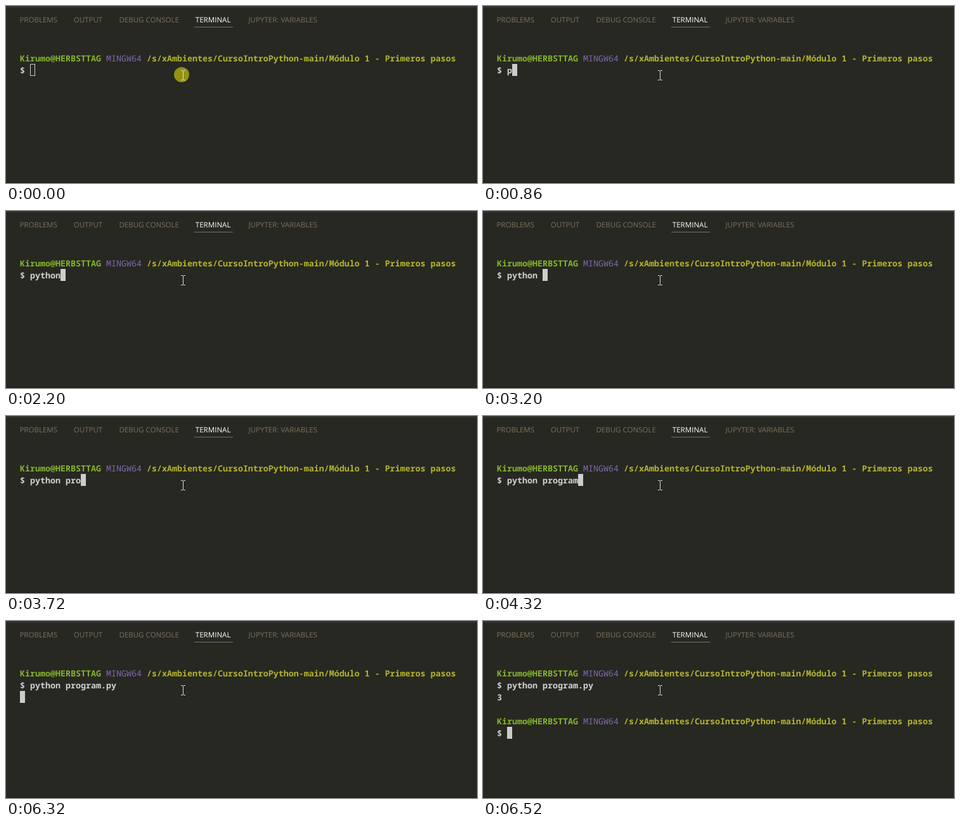
These frames come from a looping animation (743x281 px, 8700 ms). An HTML page:

```html
<!DOCTYPE html>
<html lang="es">
<head>
<meta charset="utf-8">
<title>Terminal</title>
<style>
html, body { margin: 0; width: 100%; height: 100%; overflow: hidden; background: #272822; }
svg { display: block; width: 743px; height: 281px; }
text { white-space: pre; text-rendering: geometricPrecision; }
.tab { font: 11.55px "Open Sans", "Noto Sans", sans-serif; fill: #7d705a; }
.active { fill: #fff; }
.row { font: 600 13.3333px "Noto Sans Mono", "DejaVu Sans Mono", monospace; fill: #d0d0d0; }
.user { fill: #86b42b; }
.sys { fill: #8069b0; font-weight: 500; }
.path { fill: #b3b42b; }
</style>
</head>
<body>
<svg id="stage" viewBox="0 0 743 281">
  <rect width="743" height="281" fill="#272822"/>
  <rect y="1" width="743" height="1" fill="#414339"/>
  <rect y="280" width="743" height="1" fill="#1b1c18"/>
  <rect x="297" y="33" width="61" height="1" fill="#75715e"/>
</svg>
<script>
const LOOP = 8700, LEFT = 22, TOP = 73, COL = 8, ROW = 19;
const COMMAND = "python program.py";
const KEY_TIMES = [860, 1600, 1860, 2000, 2060, 2200, 3200, 3530, 3620, 3720,
                   3860, 3910, 4120, 4320, 4980, 5240, 5510];
const FOCUS = 70, RELEASE = 130, ENTER = 6320, OUTPUT = 6380, PROMPT = 6520;

const stage = document.getElementById("stage");

function add(tag, attrs, parent = stage) {
  const el = document.createElementNS("http://www.w3.org/2000/svg", tag);
  for (const key in attrs) el.setAttribute(key, attrs[key]);
  parent.append(el);
  return el;
}

function label(x, y, cls, content = "") {
  const el = add("text", { x, y, class: cls });
  el.textContent = content;
  return el;
}

const line = (row, content) => label(LEFT, TOP + row * ROW + 15, "row", content);

function prompt(row) {
  const el = line(row);
  const parts = [
    ["user", "Kirumo@HERBSTTAG "],
    ["sys", "MINGW64 "],
    ["path", "/s/xAmbientes/CursoIntroPython-main/Módulo 1 - Primeros pasos"]
  ];
  for (const [cls, content] of parts) add("tspan", { class: cls }, el).textContent = content;
  return el;
}

const show = (el, on) => el.setAttribute("visibility", on ? "visible" : "hidden");

label(21.4, 26, "tab", "PROBLEMS");
label(106.7, 26, "tab", "OUTPUT");
label(178.4, 26, "tab", "DEBUG CONSOLE");
label(298.8, 26, "tab active", "TERMINAL");
label(382.5, 26, "tab", "JUPYTER: VARIABLES");

prompt(0);
const input = line(1, "$ ");
const result = line(2, "3");
const next = [prompt(4), line(5, "$ ")];
const block = add("rect", { width: COL, height: ROW, fill: "#ccc" });
const hollow = add("rect", { x: 38.5, y: 92.5, width: 7, height: 18, fill: "none", stroke: "#ccc" });
const halo = add("circle", { cx: 277, cy: 109, r: 12, fill: "#93930f" });
add("path", {
  d: "M276 102.5h3M280 102.5h3M279.5 103v14M276 117.5h3M280 117.5h3",
  fill: "none", stroke: "#dcdcdc"
});

function cursorCell(t, typed) {
  if (t >= PROMPT) return [2, 5];
  if (t >= OUTPUT) return [0, 3];
  if (t >= ENTER) return [0, 2];
  return [2 + typed, 1];
}

function draw(t) {
  const typed = KEY_TIMES.filter(k => k <= t).length;
  const [col, row] = cursorCell(t, typed);
  input.textContent = "$ " + COMMAND.slice(0, typed);
  block.setAttribute("x", LEFT + col * COL);
  block.setAttribute("y", TOP + row * ROW);
  show(block, t >= FOCUS);
  show(hollow, t < FOCUS);
  show(halo, t < RELEASE);
  show(result, t >= OUTPUT);
  next.forEach(el => show(el, t >= PROMPT));
}

const start = performance.now();
function tick() {
  draw((performance.now() - start) % LOOP);
  requestAnimationFrame(tick);
}
tick();
</script>
</body>
</html>
```
